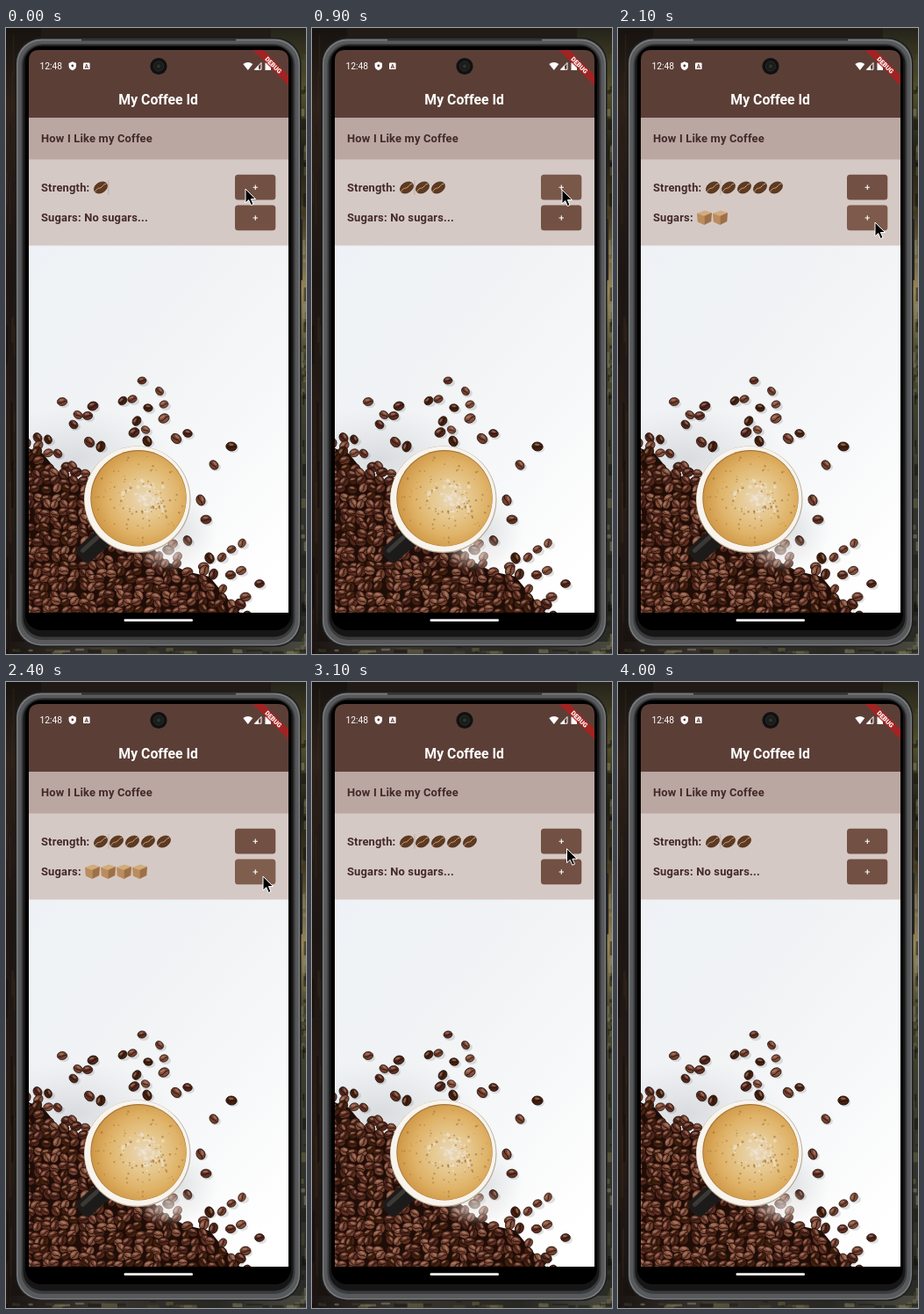
Animation of 342x712 px, one loop 4100 ms. Source, as an HTML page:

```html
<!DOCTYPE html>
<html lang="en">
<head>
<meta charset="utf-8">
<title>My Coffee Id</title>
<style>
html, body { margin: 0; width: 342px; height: 712px; overflow: hidden; background: #1b1613; }
svg { display: block; }
text { font-family: Roboto, "Noto Sans", sans-serif; }
.body { font-size: 12.93px; font-weight: 700; letter-spacing: .18px; fill: #44292a; }
</style>
</head>
<body>
<svg width="342" height="712" viewBox="0 0 342 712">
  <defs>
    <linearGradient id="wallL" x2="0" y2="1">
      <stop offset="0" stop-color="#17130f"/><stop offset=".12" stop-color="#2d2119"/>
      <stop offset=".4" stop-color="#1c1512"/><stop offset=".7" stop-color="#2a1d16"/>
      <stop offset="1" stop-color="#17120f"/>
    </linearGradient>
    <linearGradient id="wallR" x2="0" y2="1">
      <stop offset="0" stop-color="#24231a"/><stop offset=".1" stop-color="#55512b"/>
      <stop offset=".2" stop-color="#1e1d14"/><stop offset=".3" stop-color="#463a20"/>
      <stop offset=".42" stop-color="#97875a"/><stop offset=".52" stop-color="#4c4a31"/>
      <stop offset=".7" stop-color="#34352b"/><stop offset="1" stop-color="#2a2a25"/>
    </linearGradient>
    <linearGradient id="wallB">
      <stop offset="0" stop-color="#1a1512"/><stop offset=".3" stop-color="#3a3530"/>
      <stop offset=".7" stop-color="#282722"/><stop offset="1" stop-color="#4a4942"/>
    </linearGradient>
    <linearGradient id="table" x2=".8" y2="1">
      <stop offset="0" stop-color="#eef2f6"/><stop offset=".4" stop-color="#f1f3f5"/>
      <stop offset=".7" stop-color="#f7f8f9"/><stop offset="1" stop-color="#ffffff"/>
    </linearGradient>
    <radialGradient id="shade">
      <stop offset="0" stop-color="#b4b8bc" stop-opacity=".4"/>
      <stop offset="1" stop-color="#c4c8cc" stop-opacity="0"/>
    </radialGradient>
    <radialGradient id="haze">
      <stop offset="0" stop-color="#f4efec" stop-opacity=".7"/>
      <stop offset="1" stop-color="#f4efec" stop-opacity="0"/>
    </radialGradient>
    <radialGradient id="coffee" cx=".56" cy=".5" r=".56">
      <stop offset="0" stop-color="#ead7b8"/><stop offset=".35" stop-color="#e6c88f"/>
      <stop offset=".7" stop-color="#dfb267"/><stop offset="1" stop-color="#cf9745"/>
    </radialGradient>
    <clipPath id="screen"><path d="M26 665V37Q26 25 38 25H310Q322 25 322 37V665Z"/></clipPath>
    <clipPath id="photoClip"><rect x="26" y="247.500" width="296" height="417.500"/></clipPath>
    <g id="bean">
      <ellipse rx="5.600" ry="4.500" stroke="#1e0c07" stroke-width=".7"/>
      <path d="M-4.800 .8Q-1.500 2.200 0 .8T4.800 0" fill="none" stroke="#250f09" stroke-width=".8"/>
      <ellipse cx="-.6" cy="-2" rx="2.700" ry="1.100" fill="#c39482" opacity=".55"/>
    </g>
    <g id="beanIcon">
      <ellipse rx="8.100" ry="5.800" transform="rotate(-32)" fill="#5f3a20" stroke="#472817" stroke-width=".7"/>
      <path d="M-6.200 4.300C-3.600-.6-1 1.600 1-.5S3.600-4 6.200-4.300" fill="none" stroke="#c8ad92" stroke-width="1"/>
    </g>
    <g id="cube">
      <path d="M0 3.200L9 0L17 2.600L8.300 6.200Z" fill="#d3ac7d"/>
      <path d="M0 3.200L8.300 6.200V16.500L.8 13Z" fill="#bb8c5c"/>
      <path d="M17 2.600L8.300 6.200V16.500L16.300 12.600Z" fill="#9f7046"/>
    </g>
  </defs>

  <rect width="342" height="712" fill="#211a15"/>
  <rect width="40" height="712" fill="url(#wallL)"/>
  <rect x="302" width="40" height="712" fill="url(#wallR)"/>
  <rect y="698" width="342" height="14" fill="url(#wallB)"/>
  <g id="woods"></g>

  <rect x="334" y="217" width="4" height="70" rx="1.500" fill="#232426"/>
  <rect x="10.500" y="11" width="326" height="693" rx="29" fill="#1d1e1f"/>
  <rect x="12" y="12.500" width="323" height="690" rx="28" fill="#77797b"/>
  <rect x="13.500" y="14.500" width="320" height="686.500" rx="27" fill="#58595b"/>
  <rect x="17.500" y="18" width="312" height="678" rx="24" fill="#3a3b3d"/>
  <rect x="19.500" y="19.500" width="308" height="673" rx="22" fill="#161617"/>
  <rect x="22" y="21" width="303" height="664" rx="18" fill="#000"/>
  <path d="M86 13.500H262" stroke="#2b2c2d" stroke-width="2"/>
  <rect x="134.500" y="672.300" width="78.500" height="2.800" rx="1.400" fill="#fff"/>

  <g clip-path="url(#screen)">
    <rect x="26" y="25" width="296" height="78" fill="#5b3f37"/>
    <rect x="26" y="102" width="296" height="48" fill="#baa7a2"/>
    <rect x="26" y="149.500" width="296" height="100" fill="#d5c9c5"/>

    <text x="38.500" y="47" font-size="10.300" fill="#fff">12:48</text>
    <path d="M75.800 38.300L80 40V43.200Q80 46.500 75.800 48.200Q71.600 46.500 71.600 43.200V40Z" fill="#fff"/>
    <circle cx="75.800" cy="43" r="1.400" fill="#5b3f37"/>
    <rect x="88" y="39.500" width="7.600" height="7.600" rx="1.200" fill="#fff"/>
    <text x="91.800" y="45.800" font-size="6.800" font-weight="700" text-anchor="middle" fill="#5b3f37">A</text>
    <circle cx="174" cy="43.500" r="9.600" fill="#111"/>
    <circle cx="174" cy="43.500" r="5.500" fill="#1a1c1a" stroke="#292d29"/>
    <circle cx="174" cy="43.500" r="2" fill="#30342b"/>
    <path d="M270.300 41Q275.800 36.800 281.300 41L275.800 48Z" fill="#fff"/>
    <path d="M283.500 47.200L291 39.500V47.200Z" fill="none" stroke="#fff"/>
    <path d="M283 47.700L288 42.600V47.700Z" fill="#fff"/>
    <path d="M295.500 39.500H297.200V38.400H300.200V39.500H302V48H295.500Z" fill="#fff"/>

    <text x="173.700" y="87" font-size="15.800" font-weight="700" text-anchor="middle" fill="#fff">My Coffee Id</text>
    <text class="body" x="40" y="130.200">How I Like my Coffee</text>
    <text class="body" x="40" y="185.600">Strength:</text>
    <text class="body" x="40" y="220.200">Sugars: <tspan id="none">No sugars...</tspan></text>
    <g id="beans"></g>
    <g id="cubes"></g>
    <g id="buttons"></g>

    <g id="photo" clip-path="url(#photoClip)"></g>

    <g transform="translate(322 25) rotate(45)">
      <rect x="-31" y="20.100" width="62" height="8.600" fill="#b71c1c" fill-opacity=".76"/>
      <text y="27" font-size="7.300" font-weight="900" text-anchor="middle" fill="#fff">DEBUG</text>
    </g>
  </g>
  <path id="cursor" d="M0 0V16L3.700 12.600L6.300 18.600L9 17.400L6.400 11.500H11.600Z" fill="#000" stroke="#fff" stroke-width="1"/>
</svg>
<script>
const LOOP = 4100, STEP = 100;
const $ = id => document.getElementById(id);
const range = n => [...Array(n).keys()];

let seed = 11;
function rnd() {
  seed = (seed * 16807) % 2147483647;
  return seed / 2147483647;
}
const pick = list => list[Math.floor(rnd() * list.length)];

// Piecewise linear lookup in rows of [key, ...values]
function lerp(rows, k) {
  if (k <= rows[0][0]) return rows[0].slice(1);
  const i = rows.findIndex(r => r[0] >= k);
  if (i < 0) return rows[rows.length - 1].slice(1);
  const a = rows[i - 1], b = rows[i], f = (k - a[0]) / (b[0] - a[0]);
  return a.slice(1).map((v, j) => v + (b[j + 1] - v) * f);
}

const BROWNS = ['#4f261b', '#5f3022', '#72402f', '#43200f', '#824f3b'];
function bean(x, y, s) {
  const turn = rnd() * 140 - 70;
  return `<use href="#bean" fill="${pick(BROWNS)}" transform="translate(${x.toFixed(1)} ${y.toFixed(1)}) rotate(${turn.toFixed(0)}) scale(${s.toFixed(2)})"/>`;
}

const EDGE = [[20, 462], [42, 470], [60, 492], [95, 504], [150, 560], [182, 592],
  [205, 604], [232, 610], [250, 632], [270, 655], [285, 672], [330, 700]];
const LOOSE = [[155, 401], [175, 413], [64, 425], [133, 424], [144, 422], [99, 430],
  [82, 440], [93, 441], [77, 451], [162, 432], [180, 428], [149, 447], [180, 444],
  [159, 457], [146, 460], [161, 470], [194, 467], [207, 461], [95, 471], [108, 476],
  [257, 476], [237, 497], [222, 537], [228, 559], [269, 586], [257, 593], [289, 632],
  [246, 602], [207, 583], [232, 603], [268, 617], [256, 622], [190, 587], [36, 466],
  [48, 468], [59, 484], [273, 647], [263, 659]];

function drawPile() {
  let s = `<path d="M20 670L${EDGE.map(([x, y]) => x + ' ' + (y + 14)).join('L')}L330 720Z" fill="#1f0d08"/>`;
  for (let y = 462; y < 674; y += 8.6)
    for (let x = 22; x < 300; x += 10.5) {
      const px = x + rnd() * 6, py = y + rnd() * 5;
      const depth = py - lerp(EDGE, px)[0];
      const hidden = Math.hypot(px - 150, py - 536) < 52;
      const sparse = depth < 14 && rnd() < .3;
      if (!hidden && !sparse && depth > 0) s += bean(px, py, .95 + rnd() * .25);
    }
  return s;
}

function drawCup() {
  let s = '<g transform="translate(99 590) rotate(-42)"><rect x="-19" y="-11" width="38" height="22" rx="7" fill="#1d1b1a"/>' +
    '<rect x="-14" y="-7" width="27" height="5" rx="2.500" fill="#3b3836"/></g>' +
    '<ellipse cx="187" cy="596" rx="36" ry="22" fill="url(#haze)"/>' +
    '<circle cx="149.700" cy="536.300" r="60.800" fill="#b5a898"/>' +
    '<circle cx="149.500" cy="535.700" r="60" fill="#f8f4ec"/>' +
    '<circle cx="151" cy="534.700" r="54.700" fill="#a5763b"/>' +
    '<circle cx="151.300" cy="535.200" r="54" fill="url(#coffee)"/>';
  for (let i = 0; i < 170; i++) {
    const foam = i < 70, a = rnd() * 7, d = foam ? rnd() * 26 : 14 + rnd() * 37;
    const x = (foam ? 157 : 151) + d * Math.cos(a), y = 535 + d * Math.sin(a);
    const r = .5 + rnd() * (foam ? 2 : .8);
    s += `<circle cx="${x.toFixed(1)}" cy="${y.toFixed(1)}" r="${r.toFixed(1)}" fill="${foam ? '#efe4d4' : '#a56f2f'}" opacity=".6"/>`;
  }
  return s;
}

function drawPhoto() {
  const loose = LOOSE.map(([x, y]) =>
    `<ellipse cx="${x + 2}" cy="${y + 2.5}" rx="6" ry="4.500" fill="#777" opacity=".22"/>` + bean(x, y, .9 + rnd() * .22));
  $('photo').innerHTML =
    '<rect x="26" y="247" width="296" height="419" fill="url(#table)"/>' +
    '<ellipse cx="80" cy="490" rx="110" ry="60" fill="url(#shade)"/>' +
    '<ellipse cx="195" cy="572" rx="46" ry="44" fill="url(#shade)"/>' +
    loose.join('') + drawPile() + drawCup();
}

// Blurred foliage around the phone
function drawWoods() {
  const patch = (x, y, w, h, fill) =>
    `<rect x="${x.toFixed(1)}" y="${y.toFixed(1)}" width="${w.toFixed(1)}" height="${h.toFixed(1)}" rx="1" fill="${fill}" opacity=".5"/>`;
  const leaves = ['#0f0f0b', '#191a12', '#6f6b45', '#46482f', '#8d8a6c'];
  const bark = ['#0d0a08', '#35271e', '#211813'];
  $('woods').innerHTML =
    range(60).map(() => patch(335 + rnd() * 6, rnd() * 712, 2 + rnd() * 4, 4 + rnd() * 14, pick(leaves))).join('') +
    range(30).map(() => patch(rnd() * 9, rnd() * 712, 1 + rnd() * 2, 20 + rnd() * 60, pick(bark))).join('') +
    range(30).map(() => patch(rnd() * 342, 703 + rnd() * 6, 5 + rnd() * 14, 2 + rnd() * 3, pick(leaves))).join('');
}

const button = (y, id) =>
  `<rect x="261" y="${y}" width="46.300" height="28.800" rx="3.500" fill="#725044"/>
   <rect id="${id}" x="261" y="${y}" width="46.300" height="28.800" rx="3.500" fill="#d9b58f"/>
   <path d="M281.600 ${y + 14.5}h5.400m-2.700-2.700v5.400" stroke="#fff" stroke-width="1.100"/>`;

$('buttons').innerHTML = button(166.7, 'glowA') + button(201.5, 'glowB');
$('beans').innerHTML = range(5).map(i => `<use href="#beanIcon" x="${108 + i * 18}" y="181.500"/>`).join('') +
  '<path d="M116.800 173V190" stroke="#b7a49b" stroke-width=".7"/>';
$('cubes').innerHTML = range(5).map(i => `<use href="#cube" x="${90 + i * 18}" y="207.500"/>`).join('');
drawPhoto();
drawWoods();

const STRONGER = [400, 700, 1000, 1300, 3200, 3300, 3500];
const SWEETER = [1800, 2000, 2200, 2400, 2500, 2700];
const PATH = [[0, 273, 183], [100, 273, 183], [400, 285, 184], [1300, 285, 184],
  [1600, 293, 221], [2400, 293, 221], [2700, 291.5, 215], [2900, 291.5, 215],
  [3200, 290, 177], [3600, 290, 177]];
const LEAVE = 3800;

const count = (clicks, t) => clicks.filter(c => c <= t).length;
const show = (el, on) => el.setAttribute('visibility', on ? 'visible' : 'hidden');

function glow(id, clicks, t) {
  const last = clicks.filter(c => c <= t).pop();
  const age = last === undefined ? 1 : Math.min(1, (t - last) / 400);
  $(id).setAttribute('opacity', (.13 * (1 - age)).toFixed(3));
}

function render(time) {
  const t = Math.floor((time % LOOP) / STEP) * STEP;
  const strength = count(STRONGER, t) % 5 + 1;
  const sugars = count(SWEETER, t) % 6;
  range(5).forEach(i => {
    show($('beans').children[i], i < strength);
    show($('cubes').children[i], i < sugars);
  });
  show($('none'), sugars === 0);
  glow('glowA', STRONGER, t);
  glow('glowB', SWEETER, t);
  const [x, y] = lerp(PATH, t);
  $('cursor').setAttribute('transform', `translate(${x} ${y})`);
  show($('cursor'), t < LEAVE);
}

const start = performance.now();
function tick() {
  render(performance.now() - start);
  requestAnimationFrame(tick);
}
tick();
</script>
</body>
</html>
```
